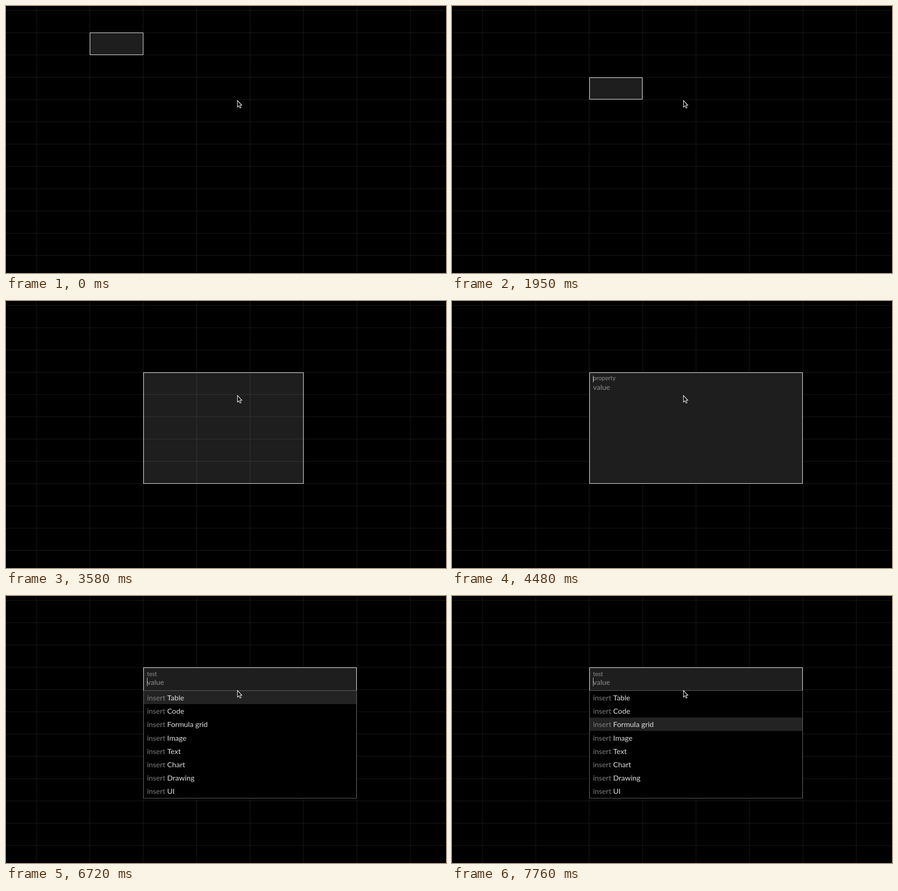
Recreate the animation shown at these times as an HTML page with a canvas. Size 961x583 px, loop 8 s.

```html
<!DOCTYPE html>
<html lang="en">
<head>
<meta charset="utf-8">
<title>Grid editor</title>
<style>
  html, body { margin: 0; width: 100%; height: 100%; overflow: hidden; background: #000; }
  canvas { display: block; }
</style>
</head>
<body>
<canvas id="stage" width="961" height="583"></canvas>
<script>
const ctx = document.getElementById('stage').getContext('2d');
const W = 961, H = 583, LOOP = 8000;
const PANEL = '#1e1e1e', ACTIVE = '#232323', EDGE = '#666', DIM = '#8e8e8e', BRIGHT = '#dedede';
const LEFT = 300, RIGHT = 766, TEXT_X = 308;
const LIST_Y = 206.8, ROW = 29.25;
const ITEMS = ['Table', 'Code', 'Formula grid', 'Image', 'Text', 'Chart', 'Drawing', 'UI'];

const colX = c => 66.2 + 116.7 * c;
const rowY = r => 9.6 + 48.65 * r;

// [start, first column, first row, end column, end row]
const SELECTIONS = [
  [0, 1, 1, 2, 2], [1350, 1, 2, 2, 3], [1500, 1, 3, 2, 4], [1950, 2, 3, 3, 4],
  [2540, 2, 3, 3, 5], [2690, 2, 3, 3, 6], [2840, 2, 3, 3, 7], [2990, 2, 3, 3, 8],
  [3280, 2, 3, 4, 8], [3580, 2, 3, 5, 8], [3730, 2, 3, 6, 8]
];
const EDIT = 4480, TYPE = 5970, VALUE = 6720;

function fill(color, x, y, w, h) {
  ctx.fillStyle = color;
  ctx.fillRect(x, y, w, h);
}

function frame(color, x, y, w, h) {
  ctx.strokeStyle = color;
  ctx.lineWidth = 1;
  ctx.strokeRect(x + .5, y + .5, w - 1, h - 1);
}

function text(str, x, y, size, color) {
  ctx.font = size + 'px Lato, sans-serif';
  ctx.fillStyle = color;
  ctx.fillText(str, x, y);
  return x + ctx.measureText(str).width;
}

function drawGrid() {
  const line = 'rgba(255,255,255,.11)';
  for (let c = 0; c < 8; c++) fill(line, colX(c) - .5, 0, 1, H);
  for (let r = 0; r < 12; r++) fill(line, 0, rowY(r) - .5, W, 1);
}

function drawSelection(t) {
  const [, c0, r0, c1, r1] = SELECTIONS.filter(s => s[0] <= t).pop();
  const x = Math.round(colX(c0)), y = Math.round(rowY(r0));
  const box = [x, y, Math.round(colX(c1)) - x, Math.round(rowY(r1)) - y];
  if (t >= VALUE) box[3] = 52;
  fill(PANEL, ...box);
  drawGrid();
  if (t >= EDIT) fill(PANEL, ...box);
  frame('#fff', ...box);
}

function drawList(count, active, drawItem) {
  const top = Math.floor(LIST_Y), bottom = Math.ceil(LIST_Y + ROW * count);
  fill('#000', LEFT, top, RIGHT - LEFT, bottom - top);
  fill(ACTIVE, LEFT + 1, LIST_Y + ROW * active, RIGHT - LEFT - 2, ROW);
  for (let i = 0; i < count; i++) drawItem(i, 228 + ROW * i * .998);
  frame(EDGE, LEFT, top, RIGHT - LEFT, bottom - top + (count > 1 ? 1 : 0));
}

function drawEditor(t) {
  const caret = (x, y, h) => fill('#ccc', Math.round(x), y, 1, h);
  text('value', TEXT_X, 194, 16, DIM);
  if (t < TYPE) {
    text('property', TEXT_X, 173, 13, DIM);
    if (t < 4920 || t >= 5520) caret(TEXT_X, 163, 15);
  } else if (t < VALUE) {
    const typed = 'test'.slice(0, t < 6120 ? 2 : t < 6270 ? 3 : 4);
    caret(text(typed, TEXT_X, 173, 13, BRIGHT), 163, 15);
    drawList(1, 0, (i, y) => text(typed, TEXT_X, y, 16, BRIGHT));
  } else {
    text('test', TEXT_X, 175, 13, DIM);
    if (t < 7170 || t >= 7760) caret(TEXT_X, 178, 19);
    drawList(ITEMS.length, t < 7310 ? 0 : t < 7610 ? 1 : 2, (i, y) => {
      text('insert', TEXT_X, y, 16.1, '#7c7c7c');
      text(ITEMS[i], 352, y, 16.1, BRIGHT);
    });
  }
}

const pointer = new Path2D('M505.5 206.5V220.8L508.7 217.8L511 222.9L513.4 221.9L511.2 216.8H515.2Z');

function drawPointer() {
  ctx.fillStyle = '#000';
  ctx.fill(pointer);
  ctx.strokeStyle = '#fff';
  ctx.lineWidth = 1.1;
  ctx.stroke(pointer);
}

function draw() {
  const t = performance.now() % LOOP;
  fill('#000', 0, 0, W, H);
  drawSelection(t);
  if (t >= EDIT) drawEditor(t);
  drawPointer();
  requestAnimationFrame(draw);
}
draw();
</script>
</body>
</html>
```
